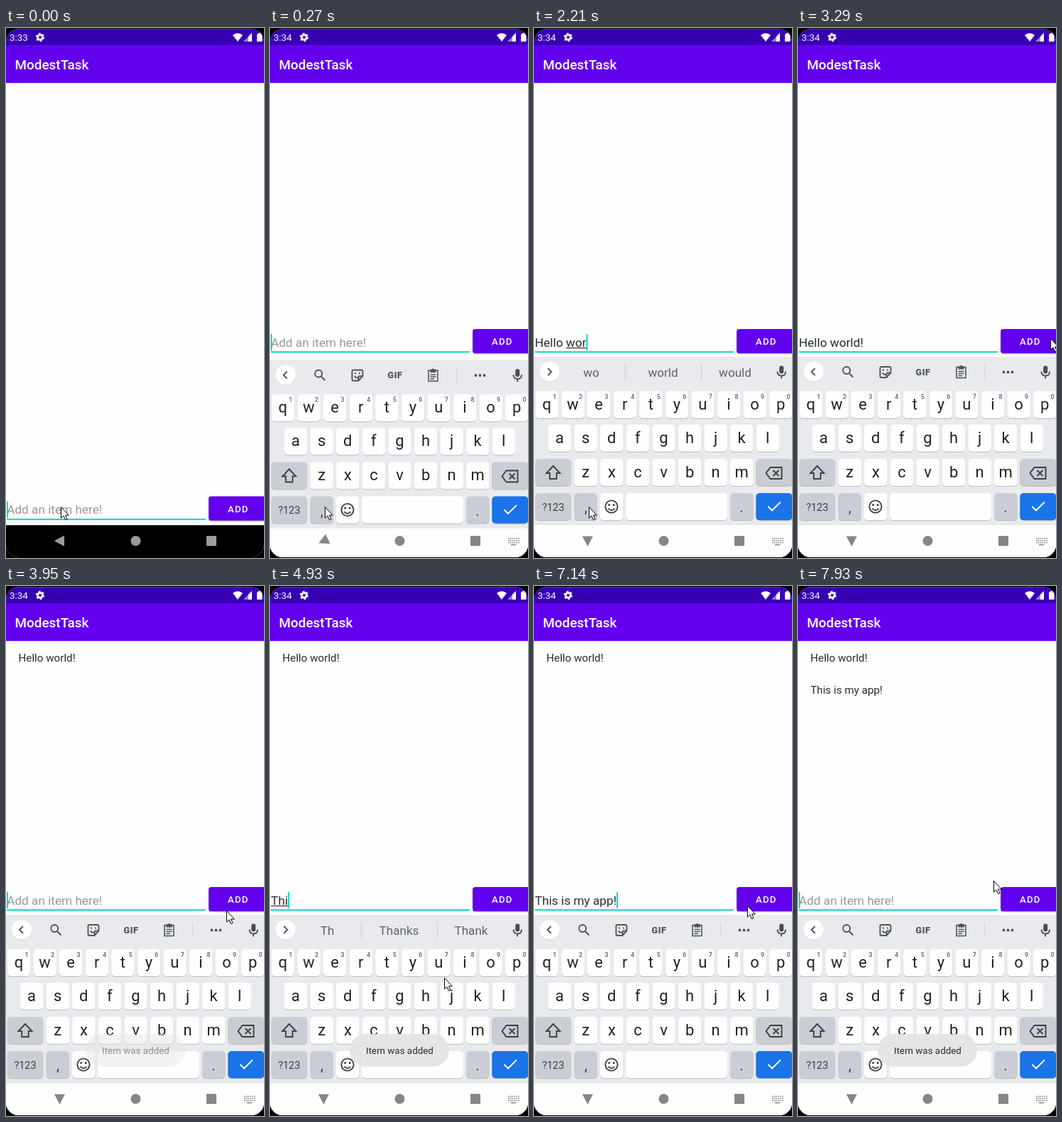
Recreate the animation shown at these times as an HTML page. Size 363 by 743 pixels, loop 8 s.

```html
<!DOCTYPE html>
<html lang="en">
<head>
<meta charset="utf-8">
<title>Todo app</title>
<style>
  html, body { margin: 0; width: 100%; height: 100%; overflow: hidden; background: #000; }
  svg { display: block; width: 100%; height: 100%; font-family: Roboto, sans-serif; }
  text { white-space: pre; }
  .mid { text-anchor: middle; }
  .line { fill: none; stroke: #50545a; stroke-width: 1.9; }
  .dark { fill: none; stroke: #3c4043; stroke-width: 1.9; }
</style>
</head>
<body>
<svg viewBox="0 0 363 743">
  <defs>
    <clipPath id="screen"><rect y="1.500" width="363" height="740.500" rx="18"/></clipPath>
    <linearGradient id="fade" x2="0" y2="1">
      <stop stop-color="#000" stop-opacity=".1"/><stop offset="1" stop-color="#000" stop-opacity="0"/>
    </linearGradient>
  </defs>
  <rect width="363" height="743"/>
  <g clip-path="url(#screen)">
    <rect width="363" height="743" fill="#fefefe"/>
    <rect y="77" width="363" height="2" fill="url(#fade)"/>
    <rect width="363" height="24" fill="#3700b3"/>
    <rect y="24" width="363" height="53" fill="#6200ee"/>

    <!-- status bar -->
    <g fill="#fff">
      <text id="clock" x="5" y="18" font-size="13.4"></text>
      <circle cx="48" cy="13" r="3.4" fill="none" stroke="#fff" stroke-width="2.8"/>
      <circle cx="48" cy="13" r="5.2" fill="none" stroke="#fff" stroke-width="2" stroke-dasharray="2.7 2.745"/>
      <path d="M319 10Q326 4.500 333 10L326 19Z"/>
      <path d="M346 7V19H334Z" opacity=".5"/>
      <path d="M346 7V19H341V12Z"/>
      <path d="M353 8.500H355V7H358.500V8.500H360.500V19H353Z"/>
      <text x="12.500" y="58" font-size="18.9" font-weight="500">ModestTask</text>
    </g>

    <g fill="#2b2b2b" font-size="15.2">
      <text id="item1" x="17.500" y="105.500">Hello world!</text>
      <text id="item2" x="17.500" y="150.500">This is my app!</text>
    </g>

    <!-- input row -->
    <g id="row">
      <rect x="1" y="453.200" width="280" height="2" fill="#03dac5"/>
      <text id="field" x="1.200" y="446.500" font-size="17.2"></text>
      <rect id="under" y="448" height="1.100" fill="#222"/>
      <rect id="caret" y="429" width="2" height="23" fill="#03dac5"/>
      <rect x="285" y="423.500" width="84" height="34" rx="4" fill="#000" opacity=".22"/>
      <rect x="285" y="422" width="84" height="34" rx="4" fill="#6200ee"/>
      <rect id="ripple" x="285" y="422" width="84" height="34" rx="4" fill="#fff" opacity=".2"/>
      <text x="312" y="444.300" font-size="13.2" font-weight="500" letter-spacing="1.180" fill="#fff">ADD</text>
    </g>

    <!-- keyboard -->
    <g id="board">
      <rect y="461" width="363" height="300" fill="#e8eaed"/>
      <rect y="697" width="363" height="120" fill="#fdfdfd"/>
      <circle cx="22" cy="483" r="14" fill="#000" opacity=".12"/>
      <circle cx="22" cy="482" r="14" fill="#fff"/>
      <path id="chevron" class="line"/>
      <g id="tools">
        <circle class="line" cx="68.300" cy="480" r="5"/>
        <path class="line" d="M72 484L77.500 489.500"/>
        <path class="line" d="M117.500 475H128.500Q130.500 475 130.500 477V483.500L124.500 490H117.500Q115.500 490 115.500 488V477Q115.500 475 117.500 475ZM130.500 483.500H126.500Q124.500 483.500 124.500 485.500V490M118.800 483.500Q120.500 486.500 123.500 485.500"/>
        <path d="M119 478.500h2v2h-2zM125 478.500h2v2h-2z" fill="#50545a"/>
        <text class="mid" x="176" y="486.500" font-size="12.5" font-weight="900" letter-spacing=".6" fill="#50545a">GIF</text>
        <path class="line" d="M223 475.500H236V490.500H223ZM225.500 481.500H233.500M225.500 484.500H233.500M225.500 487.500H231" style="stroke-width: 1.600"/>
        <path d="M225.500 474H228Q229.500 471.500 231 474H233.500V478.500H225.500Z" fill="#50545a"/>
        <path d="M262.500 472V493" stroke="#d0d3d7"/>
        <g fill="#50545a"><circle cx="289.500" cy="482.500" r="1.900"/><circle cx="295.500" cy="482.500" r="1.900"/><circle cx="301.500" cy="482.500" r="1.900"/></g>
      </g>
      <g id="words" font-size="17.1" fill="#5f6368">
        <path d="M128.500 471V494M235.500 471V494" stroke="#c8cbd0"/>
        <text class="mid" x="80.500" y="488.500"></text>
        <text class="mid" x="181.500" y="488.500"></text>
        <text class="mid" x="283" y="488.500"></text>
      </g>
      <rect x="345.200" y="473.500" width="6" height="11" rx="3" fill="#484c51"/>
      <path class="line" d="M342.500 481.500Q342.500 487.500 348.200 487.500T354 481.500M348.200 487.500V491.500"/>
      <g id="keys"></g>
      <path id="shift" class="dark" d="M27 614L36.500 624H31.800V632H22.200V624H17.500Z"/>
      <path class="dark" d="M326.500 624L332.500 616H348.500V632H332.500ZM336.500 620L344.500 628M344.500 620L336.500 628"/>
      <g fill="#3c4043">
        <text class="mid" x="27" y="676.500" font-size="14.4">?123</text>
        <text class="mid" x="73" y="679" font-size="20">,</text>
        <text class="mid" x="292" y="679" font-size="20">.</text>
        <circle cx="105.800" cy="668.500" r="1.500"/><circle cx="112.200" cy="668.500" r="1.500"/>
      </g>
      <circle class="dark" cx="109" cy="671" r="8.600"/>
      <path class="dark" d="M104.500 673.500Q109 679 113.500 673.500"/>
      <path d="M329.500 670.800L335 676.300L347 664.400" fill="none" stroke="#fff" stroke-width="2"/>
    </g>

    <!-- navigation bar -->
    <rect id="dark" y="697" width="363" height="46"/>
    <g id="nav">
      <path id="back" d="M67.700 719L82 711.500V726.500Z"/>
      <circle cx="182.500" cy="719" r="7"/>
      <rect x="282" y="712" width="14" height="14" rx="1"/>
      <g id="switch" stroke="#858585" stroke-width="1.600">
        <path d="M335 715.500H351M335 718.500H351M335 721.500H351" stroke-dasharray="1.700 1.100"/>
        <path d="M339 724.500H346.500"/>
      </g>
    </g>

    <g id="toast">
      <rect x="112" y="628" width="140" height="46" rx="23" fill="#e4e5e6" opacity=".93"/>
      <text class="mid" x="182.500" y="656" font-size="13.4" fill="#2b2b2b">Item was added</text>
    </g>
  </g>
  <path id="mouse" d="M.5 .5V16L4 12.800L6.500 18.600L9 17.500L6.500 12H11.300Z" fill="#fff" stroke="#000" stroke-linejoin="round"/>
</svg>
<script>
const LOOP = 8000, SIZE = 17.2, HINT = 'Add an item here!';
const $ = id => document.getElementById(id);
const set = (el, attrs) => { for (const k in attrs) el.setAttribute(k, attrs[k]); };
const show = (id, on) => { $(id).style.display = on ? '' : 'none'; };
const pen = document.createElement('canvas').getContext('2d');
const widthOf = s => { pen.font = SIZE + 'px Roboto, sans-serif'; return pen.measureText(s).width; };

function add(tag, attrs, text = '') {
  const el = document.createElementNS('http://www.w3.org/2000/svg', tag);
  set(el, attrs);
  el.textContent = text;
  $('keys').append(el);
  return el;
}

function key(x, y, w, fill) {
  add('rect', { x, y: y + 1, width: w, height: 38, rx: 5, fill: '#000', opacity: .2 });
  add('rect', { x, y, width: w, height: 38, rx: 5, fill });
}

const letters = [];
[['qwertyuiop', 1.8, 509], ['asdfghjkl', 19.9, 556], ['zxcvbnm', 56.6, 604]].forEach(([row, left, y], r) => {
  [...row].forEach((ch, i) => {
    const x = left + i * 36.57;
    key(x, y, 32.5, '#fefefe');
    const el = add('text', { class: 'mid', x: x + 16.2, y: y + 25.5, 'font-size': 22, fill: '#202124' });
    letters.push([el, ch]);
    if (!r) add('text', { class: 'mid', x: x + 27.2, y: 519.5, 'font-size': 9, 'font-weight': 500, fill: '#5f6368' }, (i + 1) % 10);
  });
});
const grey = '#cacdd3';
[[1.8, 604, 50.5, grey], [312.3, 604, 51, grey], [1.8, 652, 50.5, grey], [56.6, 652, 32.5, grey],
 [93, 652, 32.5, '#fefefe'], [129, 652, 143, '#fefefe'], [276, 652, 32.5, grey], [312.3, 652, 51, '#1a73e8']]
  .forEach(k => key(...k));

// each track holds a value from its time until the next entry
const typed = [[0, ''], [1070, 'H'], [1220, 'He'], [1370, 'Hel'], [1510, 'Hell'], [1640, 'Hello'], [1790, 'Hello '],
  [1920, 'Hello w'], [2060, 'Hello wo'], [2210, 'Hello wor'], [2360, 'Hello worl'], [2500, 'Hello world'],
  [2630, 'Hello world!'], [3710, ''], [4650, 'T'], [4930, 'Thi'], [5080, 'This'], [5220, 'This i'], [5360, 'This is'],
  [5510, 'This is '], [5650, 'This is m'], [5800, 'This is my'], [5950, 'This is my a'], [6070, 'This is my ap'],
  [6220, 'This is my app'], [6480, 'This is my app!'], [7330, '']];
const words = [[0, ''], [1220, 'H Hey Hi'], [1370, 'He Hello Hey'], [1510, 'Hel Hello Help'], [1640, 'Hell Hello Hells'],
  [1790, 'there I how'], [2060, 'w world we'], [2210, 'wo world would'], [2360, 'wor world work'], [2500, 'worl world worlds'],
  [2770, ''], [4930, 'Th Thanks Thank'], [5080, 'Thi This Think'], [5220, 'is was one'], [5360, 'i is it'],
  [5510, 'the a my'], [5800, 'm my me'], [5950, 'first new last'], [6070, 'a address account'],
  [6220, 'ap app apartment'], [6350, 'app apps application'], [6610, '']];
const mouse = [[0, 77, 671], [2770, 150, 580], [2910, 262, 440], [3040, 340, 362], [3170, 355, 425], [3290, 355, 435],
  [3430, 335, 436], [3850, 310, 455], [3980, 275, 505], [4120, 252, 540], [4250, 245, 549],
  [6890, 268, 500], [7040, 300, 448], [7190, 308, 438], [7630, 300, 430], [7780, 284, 418], [7930, 275, 413]];
const slide = [[0, 300, 0], [120, 60, 0], [270, 4.5, -25], [420, 0, -72], [540, 0, -90]];
const toast = [[0, 0], [3850, .5], [3980, 1], [5510, .6], [5650, .2], [5800, 0], [7480, .5], [7630, 1]];
const shifted = [[0, false], [1070, true], [1220, false], [2630, true], [2770, false]];
const pressed = [[0, false], [3570, true], [3850, false], [7190, true], [7480, false]];

const at = (track, t) => track.findLast(k => k[0] <= t);

function draw(t) {
  const open = t >= 120, text = at(typed, t)[1], guess = at(words, t)[1];
  const [, drop, turn] = at(slide, t), [, x, y] = at(mouse, t), caps = at(shifted, t)[1];

  $('clock').textContent = open ? '3:34' : '3:33';
  show('item1', t >= 3710);
  show('item2', t >= 7330);

  set($('row'), { transform: `translate(0 ${open ? 0 : 234.6})` });
  $('field').textContent = text || HINT;
  set($('field'), { fill: text ? '#2b2b2b' : '#999' });
  const end = 1.2 + widthOf(text), last = text.match(/[a-z]*$/i)[0], len = widthOf(last);
  set($('under'), { x: end - len, width: len });
  set($('caret'), { x: text ? end : 1 });
  show('caret', t < 3290 || t >= 3710);
  show('ripple', at(pressed, t)[1]);

  show('board', open);
  set($('board'), { transform: `translate(0 ${drop})` });
  show('tools', !guess);
  show('words', guess);
  set($('chevron'), { d: guess ? 'M19.500 477L24.500 482L19.500 487' : 'M24 477L19 482L24 487' });
  const parts = guess.split(' ');
  $('words').querySelectorAll('text').forEach((el, i) => { el.textContent = parts[i] || ''; });
  letters.forEach(([el, ch]) => { el.textContent = caps ? ch.toUpperCase() : ch; });
  $('shift').style.fill = caps ? '#3c4043' : 'none';

  show('dark', !open);
  show('switch', open);
  set($('nav'), { fill: open ? '#858585' : '#9c9c9c' });
  set($('back'), { transform: `rotate(${turn} 75.5 719)` });
  set($('toast'), { opacity: at(toast, t)[1] });
  set($('mouse'), { transform: `translate(${x} ${y})` });
}

const start = performance.now();
function tick() {
  draw((performance.now() - start) % LOOP);
  requestAnimationFrame(tick);
}
tick();
</script>
</body>
</html>
```
